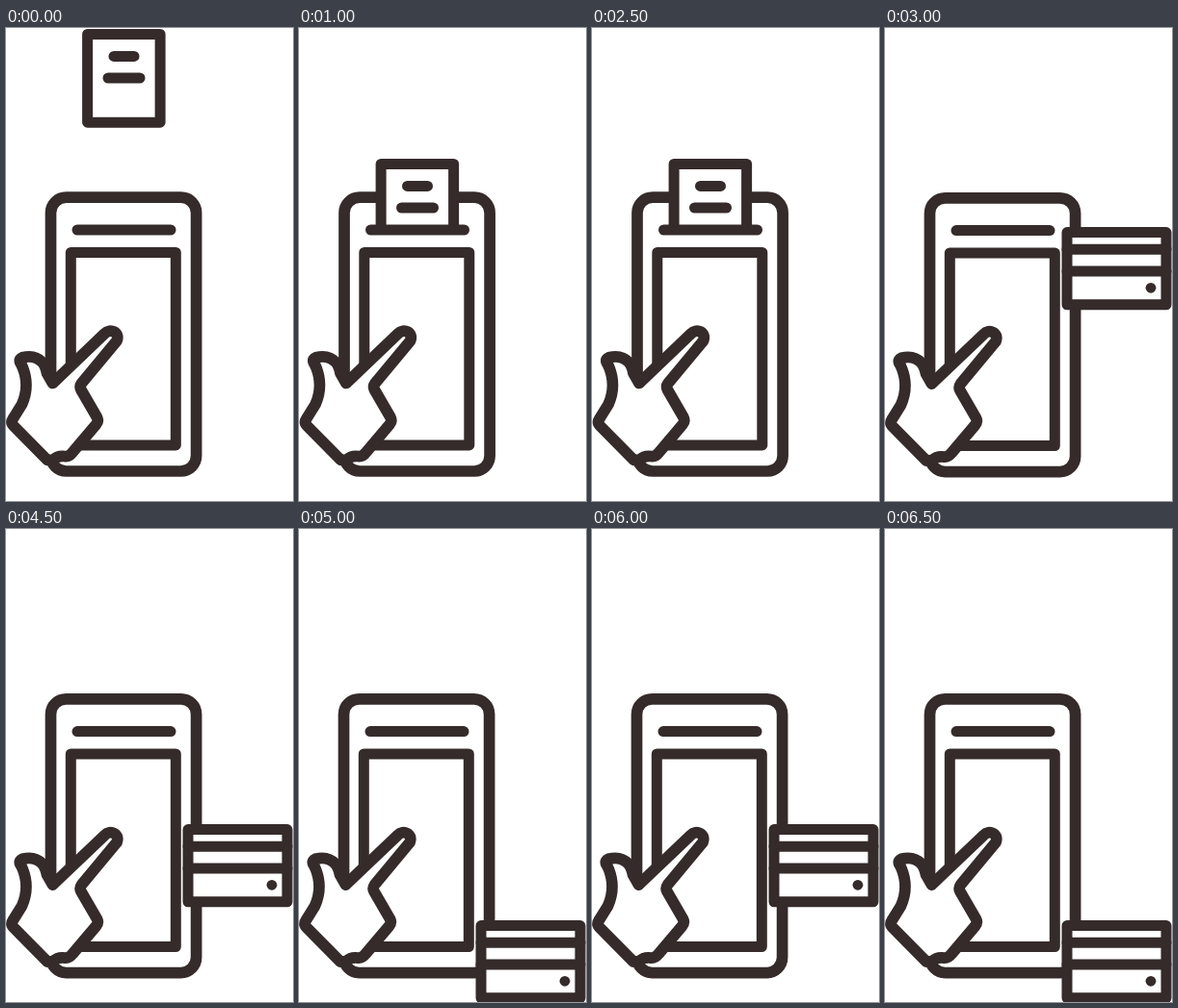
An HTML page for the animation above (7000 ms loop, 298 px wide and 492 px high).

```html
<!DOCTYPE html>
<html lang="en">
<head>
<meta charset="utf-8">
<title>Terminal: receipt and card</title>
<style>
html, body { margin: 0; width: 100%; height: 100%; overflow: hidden; background: #fff; }
svg { display: block; width: 298px; height: 492px; }
.line { fill: none; stroke: #352b2a; stroke-width: 11; stroke-linecap: round; stroke-linejoin: round; }
.body { fill: #fff; }
.thick { stroke-width: 11.7; }
.dot { fill: #352b2a; }
</style>
</head>
<body>
<svg viewBox="0 0 298 492">
  <defs>
    <clipPath id="aboveSlot"><rect width="298" height="210"/></clipPath>
  </defs>
  <g id="phone">
    <rect class="line body thick" x="46.5" y="176.2" width="151.1" height="284.8" rx="16"/>
    <rect class="line body" x="67.3" y="233.4" width="109" height="200.5"/>
  </g>
  <g clip-path="url(#aboveSlot)">
    <g id="receipt">
      <rect class="line body" x="84.6" y="6.4" width="75.5" height="91.8"/>
      <path class="line" d="M112 29.4H133M106 52H139"/>
    </g>
  </g>
  <g id="front">
    <path class="line" d="M74 210H171"/>
    <path class="line body thick" d="M43 449.5L8 414Q4.500 410.500 7.500 406L16.500 391.500
      Q23 377 20 362Q18 353 14.500 347.500Q13.500 344 17 342.700Q30 339.500 37.500 347.500
      Q41 351.500 42.500 359L48.500 369.500L102.500 317.800C108 311.800 118.800 316.500 115 325.500
      L78.500 369.500Q76 373 78 376.500L94.500 405Q96.500 409 93.500 412.500
      L69 441.500Q65.500 446.200 61 445.500Q54 444.500 49 449Z"/>
  </g>
  <g id="card">
    <rect class="line body" x="189" y="212.6" width="103" height="75.200"/>
    <path class="line" d="M189 230.200H292M189 252.900H292"/>
    <circle class="dot" cx="276" cy="270.300" r="5.400"/>
  </g>
</svg>
<script>
const BEAT = 500;
const BEATS = 14;
const CARD_BEAT = 6;   // the card replaces the receipt here
const CARD_HOLD = 2;   // extra beats at the top before its first swipe
const SWIPE = 100;
const RECEIPT_Y = [0, 50, 135];

const parts = Object.fromEntries(
  ['phone', 'receipt', 'front', 'card'].map(id => [id, document.getElementById(id)])
);

function place(part, x, y, visible = true) {
  part.setAttribute('transform', `translate(${x} ${y})`);
  part.setAttribute('visibility', visible ? 'visible' : 'hidden');
}

function draw(time) {
  const beat = Math.floor(time / BEAT) % BEATS;
  const paying = beat >= CARD_BEAT;
  const feed = beat % 3;
  const swipe = Math.max(0, beat - CARD_BEAT - CARD_HOLD) % 3;

  // The terminal gives slightly when the receipt or card touches it.
  const nudgeX = !paying && feed === 2 ? 0.5 : 0;
  const nudgeY = paying ? 0.6 : 0;

  place(parts.phone, nudgeX, nudgeY);
  place(parts.front, nudgeX, nudgeY);
  place(parts.receipt, nudgeX, RECEIPT_Y[feed], !paying);
  place(parts.card, 0, swipe * SWIPE, paying);
}

const start = performance.now();
function tick() {
  draw(performance.now() - start);
  requestAnimationFrame(tick);
}
tick();
</script>
</body>
</html>
```
